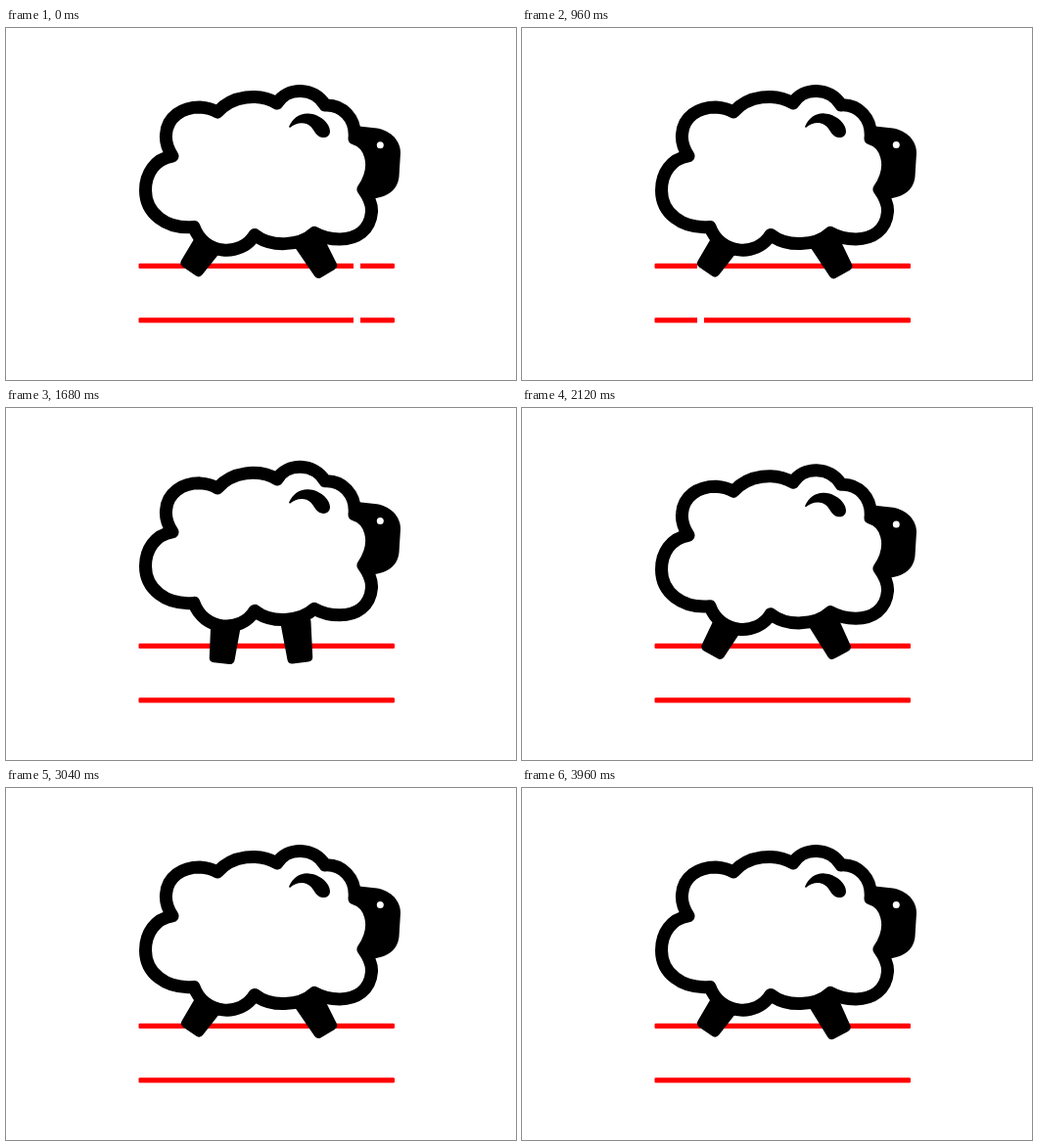
An HTML page for the animation above (4 s loop, 521 by 360 pixels).

```html
<!DOCTYPE html>
<html lang="en">
<head>
<meta charset="utf-8">
<title>Walking sheep</title>
<style>
  html, body { margin: 0; width: 100%; height: 100%; overflow: hidden; background: #fff; }
  svg { display: block; width: 521px; height: 360px; }
</style>
</head>
<body>
<svg viewBox="0 0 521 360">
  <defs>
    <path id="leg" d="M-10.500 30H10.500L8 66.500H-8Z" stroke="#000" stroke-width="10" stroke-linejoin="round"/>
  </defs>
  <g fill="#f00">
    <rect x="135.500" y="240.700" width="261.500" height="5.200" rx="1.200"/>
    <rect x="135.500" y="296.300" width="261.500" height="5.200" rx="1.200"/>
  </g>
  <rect id="gap" y="236" width="7" height="70" fill="#fff"/>
  <use id="backLeg" href="#leg"/>
  <use id="frontLeg" href="#leg"/>
  <g id="body">
    <path d="M356 100L379 102.500C393 105 403 115 403 128L401.500 152C400 167 388 174 370 175L355 165V113Z"/>
    <path fill="#fff" stroke="#000" stroke-width="13" stroke-linejoin="round" d="
      M170 131C164 122 163 115 163.500 109C164.500 91 180 81 198 81C205 81.500 211 83 216 86
      C231 69 258 66 277 77C287 60 315 60 326 79
      C343 78 358 92 356 113C371 117 382 140 365 165
      C370 172 374 180 373.500 188C372 207 358 216 341 216C332 216 322 213.500 315 209.500
      C300 223.500 270 224.500 254 211.500C240 235 202 232 192 203.500
      C163 206 142.500 189 142.500 166C142.500 149 152 134 170 131Z"/>
    <path d="M289 101C293 92 300 87 309 87.500C320 88 331 97 331 105.500C331 110.500 327 112.500 323 112
      C315 111 315 101 307 98C301 96 295 98 290 102Z"/>
    <circle cx="382.300" cy="119.700" r="3.500" fill="#fff"/>
  </g>
</svg>
<script>
  const LOOP = 4000, STEP = 40;
  const STRIDE = 1000, FRONT_STRIDE = 1014;
  const GAP_START = 355, GAP_SPEED = 176 / 960;

  const byId = id => document.getElementById(id);
  const [gap, body, backLeg, frontLeg] = ["gap", "body", "backLeg", "frontLeg"].map(byId);

  const swing = (t, period, middle, reach) =>
    middle + reach * Math.cos(2 * Math.PI * t / period);

  const pose = (leg, x, y, angle) =>
    leg.setAttribute("transform", `translate(${x} ${y}) rotate(${angle})`);

  function draw(now) {
    const t = Math.floor((now % LOOP) / STEP) * STEP;
    gap.setAttribute("x", GAP_START - GAP_SPEED * t);
    body.setAttribute("transform", `translate(0 ${swing(t, STRIDE, -2.9, 2.9)})`);
    pose(backLeg, 228, 190, swing(t, STRIDE, 14.8, 20));
    pose(frontLeg, 292.5, 189.5, swing(t, FRONT_STRIDE, -15.2, -15.3));
  }

  const start = performance.now();
  function tick() {
    draw(performance.now() - start);
    requestAnimationFrame(tick);
  }
  tick();
</script>
</body>
</html>
```
